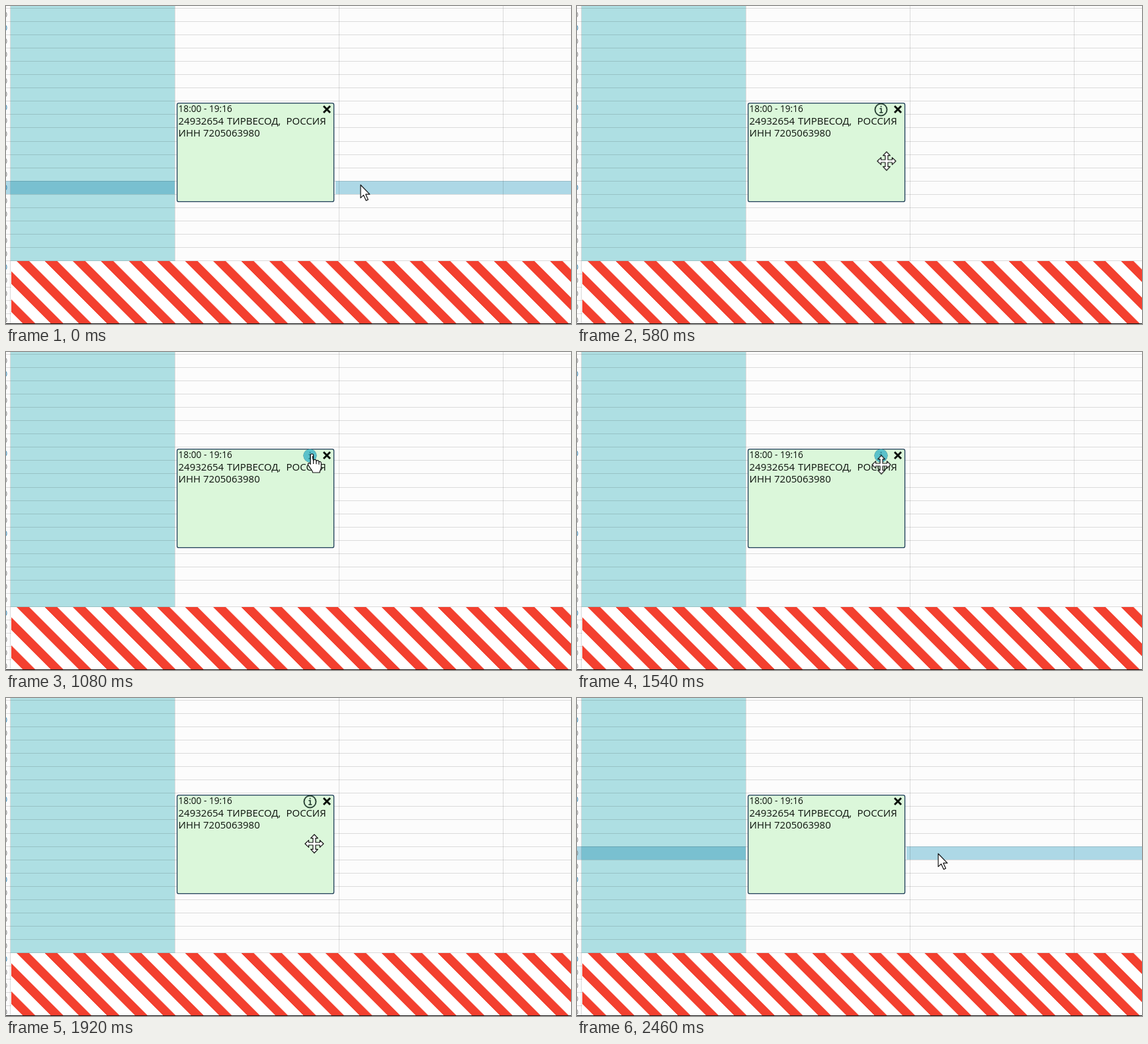
An HTML page that plays this animation: 854 by 480 pixels, repeating every 2.5 s.

```html
<!DOCTYPE html>
<html lang="ru">
<head>
<meta charset="utf-8">
<title>Schedule</title>
<style>
  html, body { margin: 0; width: 100%; height: 100%; overflow: hidden; background: #fcfcfc; }
  svg { display: block; width: 854px; height: 480px; }
  text { font-family: "Open Sans", "Noto Sans", sans-serif; font-size: 15px; fill: #0c120c; }
  .time { font-size: 13.7px; }
  .minute { font-size: 11px; fill: #777; text-anchor: end; }
  .hour { fill: #1573a8; }
  .line { stroke: #000; stroke-opacity: .13; }
  .cursor path { fill: #fff; stroke: #111; stroke-width: 1.2; stroke-linejoin: round; }
</style>
</head>
<body>
<svg viewBox="0 0 854 480">
  <defs>
    <pattern id="stripes" width="42.43" height="42.43" patternUnits="userSpaceOnUse" patternTransform="translate(58.5 385) skewX(45)">
      <rect width="42.43" height="42.43" fill="#fff"/>
      <rect width="19" height="42.43" fill="#f3402f"/>
    </pattern>
  </defs>
  <rect width="854" height="480" fill="#fcfcfc"/>
  <rect x="7" width="248" height="385" fill="#aedfe3"/>
  <g id="bands"></g>
  <g id="grid"></g>
  <rect x="8" y="385" width="846" height="94" fill="url(#stripes)"/>
  <rect y="479" width="854" height="1" fill="#111"/>

  <rect x="258.6" y="146.6" width="237" height="148.8" rx="2.5" fill="#dbf7da" stroke="#1d3b57" stroke-width="1.3"/>
  <text class="time" x="260.5" y="160">18:00 - 19:16</text>
  <text x="260.5" y="178.5">24932654 <tspan x="334">ТИРВЕСОД,</tspan> <tspan x="423.5">РОССИЯ</tspan></text>
  <text x="260.5" y="196.8">ИНН <tspan x="298">7205063980</tspan></text>
  <path d="M480 151l10 10m0-10l-10 10" stroke="#0a0f0a" stroke-width="2.9"/>

  <g id="info">
    <circle cx="459.5" cy="156.5" r="9" fill="none" stroke="#2d4639" stroke-width="2"/>
    <path d="M457.5 154.8h2.4v6m-2.6 0h5M459.6 150.8v2" fill="none" stroke="#2d4639" stroke-width="1.7"/>
  </g>
  <g id="hover">
    <circle cx="459.5" cy="156.5" r="10" fill="#5bc1ca"/>
    <path d="M457.5 154.8h2.4v6m-2.6 0h5M459.6 150.8v2" fill="none" stroke="#2b8590" stroke-width="1.7"/>
  </g>

  <g id="pointer" class="cursor">
    <path id="arrow" d="M0 0V19.6L4.5 15.4L8.2 23.6L11.4 22.2L7.7 14.2H13.8Z"/>
    <path id="move" d="M0-14L5.4-8.4H2V-2H8.4V-5.4L14 0L8.4 5.4V2H2V8.4H5.4L0 14L-5.4 8.4H-2V2H-8.4V5.4L-14 0L-8.4-5.4V-2H-2V-8.4H-5.4Z"/>
    <g id="hand">
      <path d="M-1.8 1C-1.8-2 2.6-2 2.6 1V9C3-.0 0 0 2.6 9C3.4 6.6 7 7 7 9.6C8 7.8 11 8.4 11 11C12.4 9.6 14.4 10.6 14.4 13V19C14.4 22 12.4 23.5 12.2 27H1.6C1.4 23.4-3.4 20-5.2 15.6C-6.4 12.6-3.4 11.6-1.8 14.4Z"/>
      <path d="M2.6 9v5M7 9.6v4.6M11 11v4" fill="none"/>
    </g>
  </g>
</svg>
<script>
const LOOP = 2500;
const $ = id => document.getElementById(id);

function add(parent, tag, attrs, text = '') {
  const el = document.createElementNS('http://www.w3.org/2000/svg', tag);
  for (const key in attrs) el.setAttribute(key, attrs[key]);
  el.textContent = text;
  return parent.appendChild(el);
}

const rowY = k => Math.round(2.9 + 20.06 * k);

// Calendar grid and clipped minute labels
const grid = $('grid');
for (let k = 0; k < 24; k++) {
  const y = rowY(k) + .5;
  add(grid, 'line', { class: 'line', x1: 0, x2: 854, y1: y, y2: y });
  add(grid, 'text', { class: k % 6 === 1 ? 'minute hour' : 'minute', x: 2, y: y + 13.5 }, '00');
}
for (const x of [6.5, 255.5, 503.5, 751.5])
  add(grid, 'line', { class: 'line', x1: x, x2: x, y1: 0, y2: 480 });

function band(k) {
  const g = add($('bands'), 'g', {});
  const y = rowY(k), height = rowY(k + 1) - y;
  for (const [x, width, fill] of [[0, 7, '#add8e6'], [7, 248, '#79c0d0'], [498, 356, '#add8e6']])
    add(g, 'rect', { x, y, width, height, fill });
  return g;
}

const play = (el, frames) => el.animate(frames, { duration: LOOP, iterations: Infinity });

// steps: [ms, opacity, easing until the next step]
function fade(el, steps) {
  const last = steps[steps.length - 1];
  play(el, [...steps, [LOOP, last[1]]].map(([ms, opacity, easing = 'steps(1)']) =>
    ({ offset: ms / LOOP, opacity, easing })));
}

const path = [
  [0, 536, 270], [40, 535, 271], [80, 534, 272], [250, 534, 272],
  [330, 515, 264], [370, 496, 254], [460, 478, 241], [580, 468, 234],
  [750, 455, 248], [790, 455, 248], [900, 458, 206], [1000, 461, 164],
  [1080, 462, 155], [1210, 462, 155], [1330, 461, 159], [1500, 461, 159],
  [1540, 460, 170], [1700, 463, 198], [1880, 466, 220], [1960, 466, 220],
  [2040, 488, 221], [2080, 505, 222], [2130, 518, 223], [2170, 526, 226],
  [2300, 540, 232], [2460, 546, 235], [2500, 546, 235]
];
play($('pointer'), path.map(([ms, x, y]) =>
  ({ offset: ms / LOOP, transform: `translate(${x}px, ${y}px)` })));

fade($('arrow'), [[0, 1], [370, 0], [2080, 1]]);
fade($('move'), [[0, 0], [370, 1], [1000, 0], [1540, 1], [2080, 0]]);
fade($('hand'), [[0, 0], [1000, 1], [1540, 0]]);

fade($('info'), [[0, 0], [370, 1], [2080, 0]]);
fade($('hover'), [[0, 0], [1000, 0, 'ease'], [1080, 1], [1545, 1, 'ease'], [1700, 0]]);

fade(band(13), [[0, 1], [370, 1, 'ease'], [570, 0]]);
fade(band(10), [[0, 0], [2080, 0, 'ease'], [2170, .8, 'ease'], [2350, 0]]);
fade(band(11), [[0, 0], [2170, 0, 'ease'], [2370, 1]]);
</script>
</body>
</html>
```
